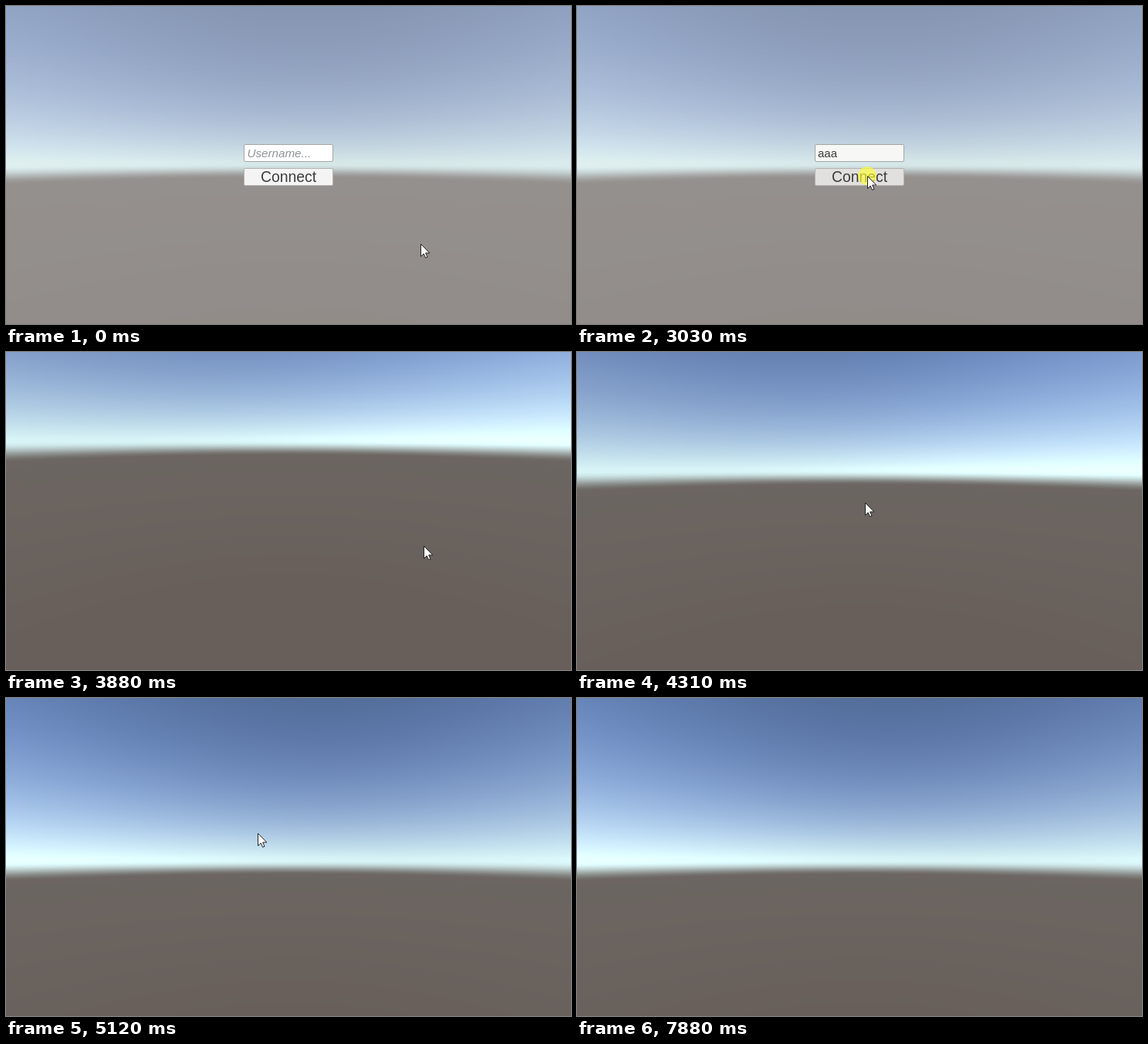
Animation, 732 px wide and 412 px high, one loop 8000 ms. Source, as an HTML page with a canvas:

```html
<!DOCTYPE html>
<html lang="en">
<head>
<meta charset="utf-8">
<title>Connect screen</title>
<style>
html, body { margin: 0; width: 100%; height: 100%; overflow: hidden; background: #69635f; }
canvas, svg { position: absolute; left: 0; top: 0; width: 732px; height: 412px; display: block; }
text { font-family: "Liberation Sans", Arial, sans-serif; fill: #3c3c3c; }
</style>
</head>
<body>
<canvas id="sky" width="732" height="412"></canvas>
<svg viewBox="0 0 732 412">
  <g id="menu">
    <rect width="732" height="412" fill="#d4d4d2" opacity=".39"/>
    <rect id="field" x="308.5" y="179.5" width="115" height="22" rx="1.5" stroke="#a3a6a5"/>
    <text id="hint" x="312.5" y="196" font-size="15.2" font-style="italic" style="fill:#8f9498">Username...</text>
    <text id="typed" x="312" y="196" font-size="15"></text>
    <rect id="caret" y="181" width="1" height="18" fill="#323232"/>
    <rect id="button" x="308.5" y="210.5" width="115" height="22" rx="1.5" stroke="#b4b3b1"/>
    <text x="366" y="228" font-size="19.4" text-anchor="middle">Connect</text>
  </g>
  <circle id="click" r="12" fill="#ffff30" opacity=".65"/>
  <path id="cursor" d="M.5 .5V16.5L4.2 13L6.6 18.3L9 17.3L6.6 12H11.8Z" fill="#fff" stroke="#222"/>
</svg>
<script>
const LOOP = 8000, W = 732, H = 412, FOCAL = 357, COLS = 123;
const $ = id => document.getElementById(id);
const clamp = v => Math.max(0, Math.min(1, v));
const smooth = v => v * v * (3 - 2 * v);
const lerp = (a, b, p) => a + (b - a) * p;

// Pointer tip, height of the horizon, direction of the darkest sky in degrees
const home = { x: 537, y: 308, horizon: 202, dark: 12 };

// Eased, stepped moves: what a move leaves out stays as it was
const moves = [
  { from: 70, to: 70, steps: 1, x: 441, y: 236 },
  { from: 270, to: 720, steps: 8, x: 402, y: 193 },
  { from: 2140, to: 2530, steps: 5, x: 376, y: 220 },
  { from: 3600, to: 3880, steps: 5, x: 541, y: 251, horizon: 112, dark: -35 },
  { from: 3950, to: 4310, steps: 6, x: 373, y: 195, horizon: 151, dark: -38 },
  { from: 4380, to: 4710, steps: 6, x: 446, y: 182, horizon: 177 },
  { from: 4770, to: 5120, steps: 6, x: 326, y: 175, horizon: 208, dark: 18 },
  { from: 6640, to: 7410, steps: 12, x: 602, y: 328 },
  { from: 7490, to: 7880, steps: 7, x: 631, y: 440 }
];

function poseAt(t) {
  const pose = { ...home };
  for (const m of moves) {
    if (t < m.from) break;
    const gap = (m.to - m.from) / (m.steps - 1) || 1;
    const step = Math.floor((t - m.from) / gap + .1) + 1;
    const p = smooth(clamp(step / m.steps));
    for (const key in pose) if (key in m) pose[key] = lerp(pose[key], m[key], p);
  }
  return pose;
}

// For red, green and blue: zenith, gain towards the horizon, its falloff, ground near, ground far
const channels = [[70, 145, 85, 108, 104], [95, 148, 88, 102, 95], [100, 145, 205, 98, 90]];

const strip = document.createElement("canvas");
strip.width = COLS;
strip.height = H;
const stripCtx = strip.getContext("2d"), pixels = stripCtx.createImageData(COLS, H);
const ctx = $("sky").getContext("2d");
let lastView = "";

function drawSky(horizon, dark) {
  const view = horizon + "," + dark;
  if (view === lastView) return;
  lastView = view;
  const pitch = Math.atan((horizon - H / 2) / FOCAL);
  const c = Math.cos(pitch), s = Math.sin(pitch), away = dark * Math.PI / 180;
  const data = pixels.data;
  let n = 0;
  for (let y = 0; y < H; y++) {
    const v = H / 2 - y - .5, up = v * c + FOCAL * s, ahead = FOCAL * c - v * s;
    for (let i = 0; i < COLS; i++) {
      const x = (i + .5) * W / COLS - W / 2;
      const slope = FOCAL * up / Math.hypot(x, ahead);
      const height = Math.max(0, slope);
      const haze = smooth(clamp((slope + 21) / 18));
      const depth = clamp(-slope / 200);
      const glow = 1 + .1 * Math.sin(Math.atan2(x, ahead) - away) ** 2;
      for (const [zenith, gain, fall, near, far] of channels) {
        const air = (zenith + gain * Math.exp(-height / fall)) * glow;
        data[n++] = lerp(lerp(near, far, depth), air, haze);
      }
      data[n++] = 255;
    }
  }
  stripCtx.putImageData(pixels, 0, 0);
  ctx.drawImage(strip, 0, 0, W, H);
}

const show = (id, on) => $(id).setAttribute("visibility", on ? "inherit" : "hidden");
const fill = (id, color) => $(id).setAttribute("fill", color);
const within = (t, a, b) => t >= a && t < b;

function draw(t) {
  const { x, y, horizon, dark } = poseAt(t);
  drawSky(horizon, dark);

  const count = t < 1870 ? 0 : Math.min(3, 1 + Math.floor((t - 1870) / 130));
  show("menu", t < 3200);
  fill("field", t >= 590 ? "#f7f7f5" : "#fff");
  fill("button", t < 3030 ? "#f4f4f4" : t < 3070 ? "#e2e0df" : "#c8c8c8");
  show("hint", !count);
  $("typed").textContent = "a".repeat(count);
  $("caret").setAttribute("x", 312 + Math.round(count * 8.34));
  show("caret", within(t, 690, 1280) || within(t, 1870, 2870));

  show("click", within(t, 590, 690) || within(t, 3030, 3200));
  const place = `translate(${Math.round(x)} ${Math.round(y)})`;
  $("click").setAttribute("transform", place);
  $("cursor").setAttribute("transform", place);
}

const began = performance.now();
function tick() {
  draw((performance.now() - began) % LOOP);
  requestAnimationFrame(tick);
}
tick();
</script>
</body>
</html>
```
